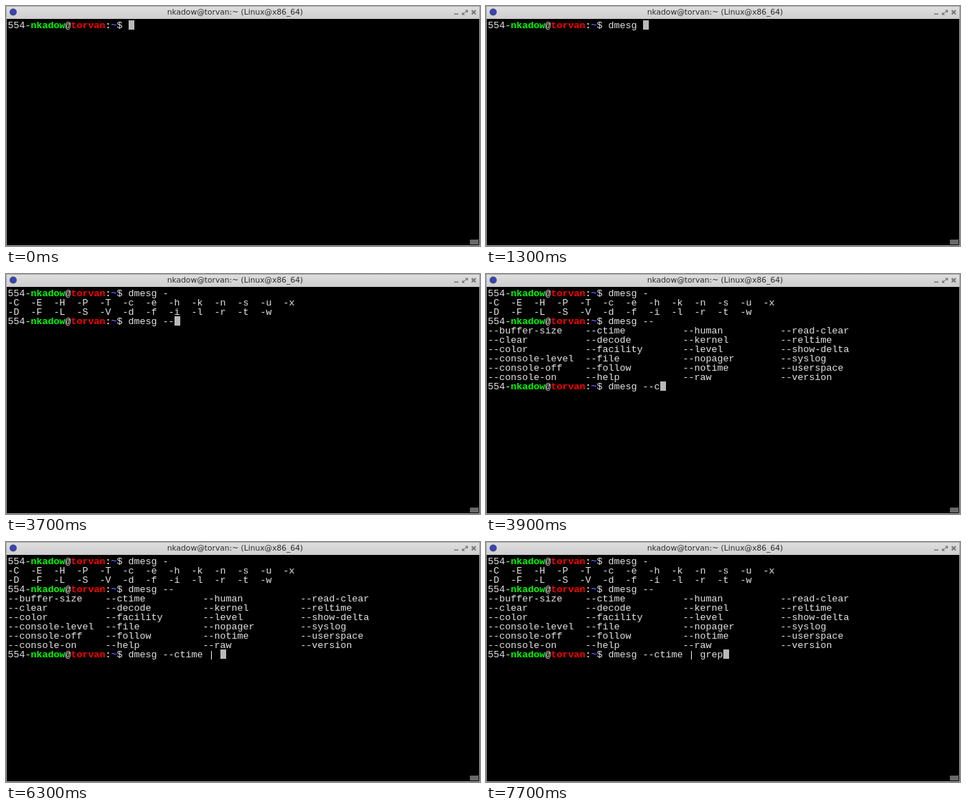
Recreate the animation shown at these times as an HTML page. Size 661x335 px, loop 8 s.

```html
<!DOCTYPE html>
<html lang="en">
<head>
<meta charset="utf-8">
<title>Terminal</title>
<style>
  html, body { margin: 0; width: 100%; height: 100%; overflow: hidden; background: #000; }
  svg { display: block; width: 661px; height: 335px; }
  text { white-space: pre; }
  #screen { font: 13.3333px "Liberation Mono", "DejaVu Sans Mono", monospace; fill: #e5e5e5; }
  #title { font: 10.7px "DejaVu Sans", sans-serif; fill: #2b2b2b; text-anchor: middle; }
  .bold { font-weight: bold; }
</style>
</head>
<body>
<svg viewBox="0 0 661 335" xmlns="http://www.w3.org/2000/svg">
  <defs>
    <linearGradient id="bar" x2="0" y2="1">
      <stop offset="0" stop-color="#dedede"/>
      <stop offset="1" stop-color="#cecece"/>
    </linearGradient>
    <pattern id="grip" width="2" height="2" patternUnits="userSpaceOnUse">
      <path d="M0 0h1v1h-1zM1 1h1v1h-1z" fill="#d0d0d0" shape-rendering="crispEdges"/>
    </pattern>
  </defs>
  <rect width="661" height="335" fill="#a6a6a6"/>
  <rect x="1" y="1" width="659" height="17" fill="url(#bar)"/>
  <rect x="1" y="18" width="659" height="316" fill="#000"/>
  <circle cx="10" cy="8.5" r="5" fill="#3c45a5"/>
  <text id="title" x="319.5" y="12"></text>
  <g fill="none" stroke="#777" stroke-width="1.5">
    <path d="M625 11.2h6"/>
    <path d="M640.5 6h3v3M643 6.5l-2.5 2.5M636.5 9v3h3M637 11.5l2.5-2.5" stroke-width="1.2"/>
    <path d="M649.5 6l5.5 5.5M655 6l-5.5 5.5" stroke-width="2"/>
  </g>
  <g id="screen"></g>
  <rect id="cursor" width="8" height="13" fill="#b9b9b9"/>
  <rect x="647" y="326" width="12" height="7" fill="url(#grip)"/>
</svg>
<script>
const NS = "http://www.w3.org/2000/svg";
const LOOP = 8000, LEFT = 3, TOP = 20, CELL = 8, LINE = 13, PROMPT_COLS = 21;
const USER = "nkadow", HOST = "torvan";

const PROMPT = [
  ["554-"], [USER, "#00ff00"], ["@"], [HOST, "#ff0000"],
  [":", "#e5e5e5"], ["~", "#5c5cff"], ["$ "]
];
const SHORT = ["CEHPTcehknsux", "DFLSVdfilrtw"].map(row => [...row].map(c => "-" + c));
const LONG = [
  "buffer-size ctime human read-clear",
  "clear decode kernel reltime",
  "color facility level show-delta",
  "console-level file nopager syslog",
  "console-off follow notime userspace",
  "console-on help raw version"
].map(row => row.split(" ").map(word => "--" + word));

// Start time and the command typed so far.
const TYPING = [
  [0, ""], [500, "dm"], [700, "dme"], [900, "dmes"], [1300, "dmesg "],
  [2900, "dmesg -"], [3700, "dmesg --"], [3900, "dmesg --c"],
  [4700, "dmesg --ct"], [5100, "dmesg --ctime "], [5900, "dmesg --ctime |"],
  [6300, "dmesg --ctime | "], [7300, "dmesg --ctime | gr"],
  [7500, "dmesg --ctime | gre"], [7700, "dmesg --ctime | grep"]
];
const SHORT_AT = 3300, LONG_AT = 3900;
const FINISHED = ["dmesg -", "dmesg --"];

const screen = document.getElementById("screen");
const cursor = document.getElementById("cursor");
document.getElementById("title").textContent = `${USER}@${HOST}:~ (Linux@x86_64)`;

function put(parent, row, col, string, color) {
  const text = document.createElementNS(NS, "text");
  text.setAttribute("x", LEFT + col * CELL - 0.5);
  text.setAttribute("y", TOP + row * LINE + 11);
  if (color) {
    text.setAttribute("class", "bold");
    text.setAttribute("fill", color);
  }
  text.textContent = string;
  parent.append(text);
  return text;
}

function putPrompt(parent, row) {
  let col = 0;
  for (const [string, color] of PROMPT) {
    put(parent, row, col, string, color);
    col += string.length;
  }
  return put(parent, row, PROMPT_COLS, "");
}

function putTable(parent, top, rows, width) {
  rows.forEach((words, r) => words.forEach((word, c) => put(parent, top + r, c * width, word)));
}

const blocks = [[0, 0], [SHORT_AT, 3], [LONG_AT, 10]].map(([start, row]) => {
  const node = document.createElementNS(NS, "g");
  screen.append(node);
  return { node, start, row, command: putPrompt(node, row) };
});
putTable(blocks[1].node, 1, SHORT, 4);
putTable(blocks[2].node, 4, LONG, 17);

function render(time) {
  const typed = TYPING.findLast(([start]) => time >= start)[1];
  const active = blocks.findLastIndex(block => time >= block.start);
  blocks.forEach((block, i) => {
    block.node.setAttribute("visibility", i <= active ? "visible" : "hidden");
    block.command.textContent = i < active ? FINISHED[i] : typed;
  });
  cursor.setAttribute("x", LEFT + (PROMPT_COLS + typed.length) * CELL);
  cursor.setAttribute("y", TOP + blocks[active].row * LINE);
}

const origin = performance.now();
function tick() {
  render((performance.now() - origin) % LOOP);
  requestAnimationFrame(tick);
}
tick();
</script>
</body>
</html>
```
